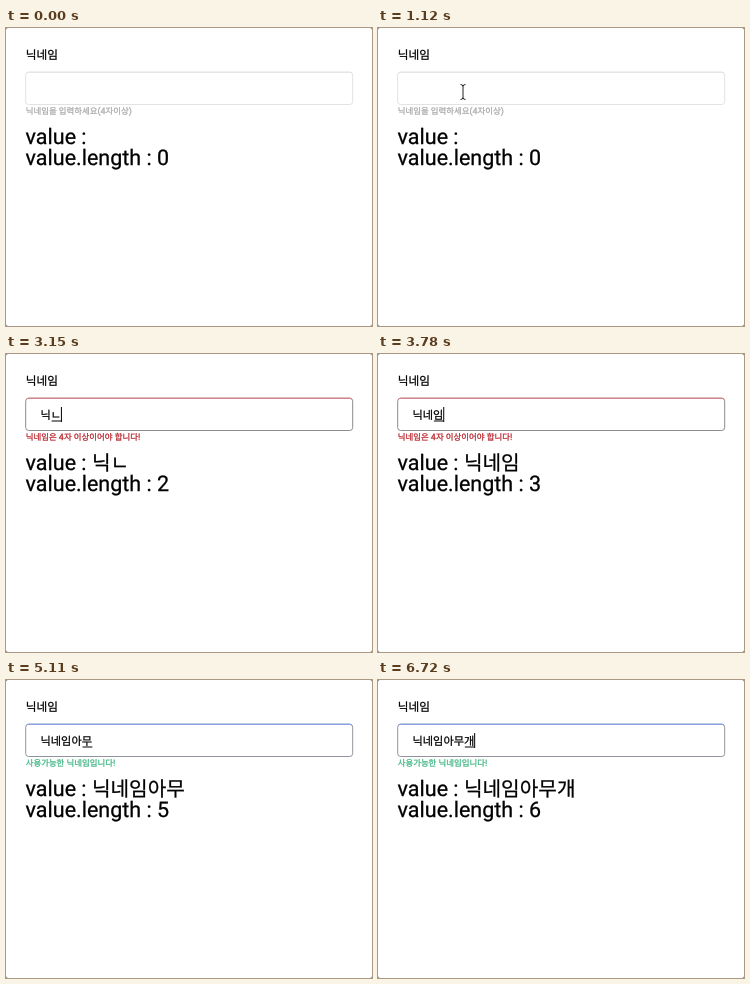
Animation of 366x298 px, one loop 6790 ms. Source, as an HTML page:

```html
<!DOCTYPE html>
<html lang="ko">
<head>
<meta charset="utf-8">
<title>닉네임</title>
<style>
  html, body { margin: 0; width: 100%; height: 100%; overflow: hidden; background: #666; }
  svg { display: block; width: 366px; height: 298px; background: #fff; border-radius: 2px; }
  text {
    font-family: Roboto, "Noto Sans CJK KR", sans-serif; white-space: pre;
    text-rendering: geometricPrecision; fill: #000; stroke: #000; stroke-width: .25px;
  }
  .hangul { font-family: "Noto Sans CJK KR", sans-serif; font-size: .941em; }
</style>
</head>
<body>
<svg viewBox="0 0 366 298">
  <text id="label" x="19.7" y="31.3" font-size="12.4"></text>
  <rect id="box" x="19.7" y="44.2" width="327" height="32.3" rx="3" fill="none"/>
  <path id="boxTop" d="M20.4 45.4Q21.2 44.2 22.7 44.2H343.7Q345.2 44.2 346 45.4" fill="none"/>
  <text id="entry" x="34.5" y="64.7" font-size="11.9"></text>
  <path id="underline" stroke="#000"/>
  <path id="caret" stroke="#000"/>
  <text id="hint" x="19.7" y="86" font-size="8.95"></text>
  <text id="value" x="19.6" y="115.7" font-size="21.5"></text>
  <text id="count" x="19.6" y="137.1" font-size="21.5"></text>
  <circle id="ring" fill="none" stroke="#333" stroke-width="1.5"/>
  <g id="pointer">
    <path id="arrow" d="M0-.5V13.8L3.2 10.8L5.4 15.7L7.6 14.7L5.5 9.9H9.8Z" stroke="#fff" stroke-width=".8"
          style="filter: drop-shadow(0 1px 1px #0006)"/>
    <path id="beam" d="M-2.5-7.5Q0-7.5 0-5.5V5.5Q0 7.5-2.5 7.5M2.5-7.5Q0-7.5 0-5.5M0 5.5Q0 7.5 2.5 7.5"
          fill="none" stroke="#222"/>
  </g>
</svg>
<script>
const LOOP = 6790, TICK = 70, CHAR = 10.31, ENTRY_X = 34.8;

// Text in the field after each keystroke of the Hangul input method
const typing = [
  [0, ''], [2030, 'ㄴ'], [2520, '니'], [2800, '닉'], [3150, '닉ㄴ'], [3220, '닉네'],
  [3500, '닉넹'], [3570, '닉네이'], [3780, '닉네임'], [4200, '닉네임ㅇ'], [4340, '닉네임아'],
  [4550, '닉네임암'], [4620, '닉네임아무'], [5320, '닉네임아묵'], [5390, '닉네임아무개']
];

// Pointer trips as [time, x, y]; the pointer is hidden outside them
const trips = [
  { end: 1960, points: [[70, 108, 281], [140, 150, 142], [210, 182, 239], [490, 182, 239], [560, 163, 213],
    [630, 131, 170], [770, 104, 108], [980, 87, 67], [1120, 85, 64]] },
  { end: 6720, points: [[6230, 84, 66], [6370, 58, 120], [6510, 85, 200], [6650, 148, 285]] }
];
const presses = [{ start: 210, end: 350, r: 22 }, { start: 1190, end: 1330, r: 17.2 }];

const looks = {
  idle:  { top: '#e2e2e2', side: '#e2e2e2', ink: '#a9a9a9', hint: '닉네임을 입력하세요(4자이상)' },
  focus: { top: '#7b9af0', side: '#92949c', ink: '#9c9c9c', hint: '닉네임을 입력하세요(4자이상)' },
  error: { top: '#e8747b', side: '#8c8c8c', ink: '#b9252d', hint: '닉네임은 4자 이상이어야 합니다!' },
  valid: { top: '#7b9af0', side: '#92949c', ink: '#3db582', hint: '사용가능한 닉네임입니다!' }
};

const el = id => document.getElementById(id);
const set = (id, attrs) => { for (const k in attrs) el(id).setAttribute(k, attrs[k]); };
const show = (id, on) => set(id, { visibility: on ? 'visible' : 'hidden' });

function write(id, text) {
  if (el(id).textContent !== text)
    el(id).innerHTML = text.replace(/[ㄱ-힣]+/g, '<tspan class="hangul">$&</tspan>');
}

function along(points, t) {
  const next = points.findIndex(p => p[0] > t);
  if (next < 0) return points[points.length - 1].slice(1);
  const [t0, x0, y0] = points[next - 1], [t1, x1, y1] = points[next];
  const k = (t - t0) / (t1 - t0);
  return [x0 + (x1 - x0) * k, y0 + (y1 - y0) * k];
}

function drawField(t) {
  const [typedAt, text] = typing.findLast(step => step[0] <= t);
  const n = text.length;
  const look = looks[n > 4 ? 'valid' : n ? 'error' : t >= 1190 ? 'focus' : 'idle'];
  set('box', { stroke: look.side });
  set('boxTop', { stroke: look.top });
  set('hint', { style: `fill: ${look.ink}; stroke: ${look.ink}` });
  write('hint', look.hint);
  write('entry', text);
  write('value', 'value : ' + text);
  write('count', 'value.length : ' + n);

  const end = ENTRY_X + n * CHAR;
  const lastKey = Math.max(typedAt, 1190);
  const blinkOff = n === 6 ? 560 : 490;
  set('underline', { d: `M${end - CHAR + .5} 67H${end}` });
  set('caret', { d: `M${end} 53V68` });
  show('underline', n > 0);
  show('caret', t >= 1190 && (t - lastKey < blinkOff || t >= 6160));
}

function drawPointer(t) {
  const trip = trips.find(({ points, end }) => t >= points[0][0] && t < end);
  const press = presses.find(p => t >= p.start && t < p.end);
  const [x, y] = trip ? along(trip.points, t) : [0, 0];
  const inField = x > 19 && x < 347 && y > 44 && y < 77;
  set('pointer', { transform: `translate(${x} ${y})` });
  show('arrow', trip && !inField);
  show('beam', trip && inField);
  show('ring', press);
  if (press) set('ring', { cx: x, cy: y, r: press.r });
}

function frame(now) {
  const t = Math.floor(Math.max(0, now - start) % LOOP / TICK) * TICK;
  drawField(t);
  drawPointer(t);
  requestAnimationFrame(frame);
}

write('label', '닉네임');
const start = performance.now();
frame(start);
</script>
</body>
</html>
```
